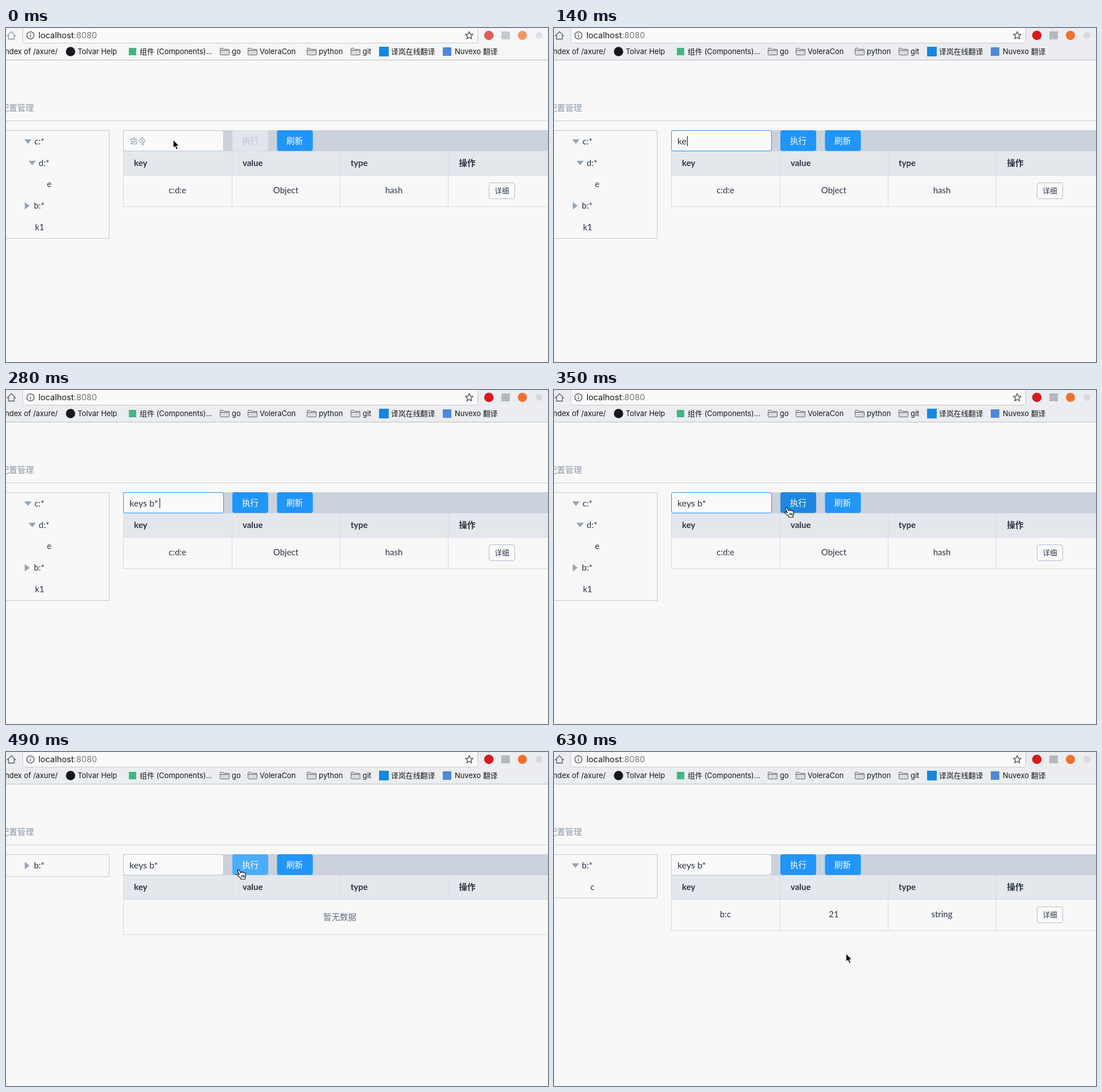
An HTML page that plays this animation: 953x588 px, repeating every 0.7 s.

```html
<!DOCTYPE html>
<html lang="zh">
<head>
<meta charset="utf-8">
<style>
  html, body { margin: 0; width: 100%; height: 100%; overflow: hidden; background: #f8f8f8; }
  svg { display: block; width: 953px; height: 588px; }
  text { font: 15px Lato, "Noto Sans CJK SC", "Noto Sans CJK", sans-serif; fill: #2b3545; white-space: pre; }
  .ui text { font: 12.9px Inter, "Noto Sans CJK SC", "Noto Sans CJK", sans-serif; fill: #141619; }
  .ui .url { font-size: 14.6px; }
  .cjk { font-size: 14.6px; }
  .head text { font-weight: 700; }
  .mid { text-anchor: middle; }
  .white { fill: #fff; }
  .typed { font-size: 16px; }
  .muted { fill: #8c98a9; }
  .line { fill: none; stroke: #d2dbe6; }
  .tri { fill: #93a4bb; }
</style>
</head>
<body>
<svg viewBox="0 0 953 588">
  <defs>
    <g id="folder" fill="#d9dadc" stroke="#65686c">
      <path d="M.5 11.5v-10q0-1 1-1h4l2 2h8q1 0 1 1v8q0 1-1 1h-14q-1 0-1-1z"/>
      <path d="M.5 4.5h16" fill="none"/>
    </g>
    <path id="arrow" d="M0 0v14.2l3.2-3 2.6 6 2.4-1-2.6-5.8h4.6z" fill="#000" stroke="#fff"/>
    <path id="hand" d="M-1 1.5Q0-1 2 1l3 5V4.5q2-1 2.5.6 2-1 2.6.7 2.4-.7 2.8 1.2l.7 4-1.2 3.5v2.5H5.2l-1-2.5L-2 9.6q-.8-2 1.4-1.8L2.2 9z M6.6 9.5v4M8.7 9.5v4M10.8 9.5v4"
      fill="#fff" stroke="#111" stroke-width="1.2" stroke-linejoin="round"/>
  </defs>
  <rect width="953" height="588" fill="#f8f8f8"/>

  <g class="ui">
    <rect id="chrome" width="953" height="56"/>
    <path d="M0 56.5h953" stroke="#b9bfc7"/>
    <rect x="29.5" y="-5" width="800" height="31.500" rx="3" fill="#fafafa" stroke="#c3c7cc"/>
    <path id="home" d="M2.500 13.500l7-7 7 7h-2v6h-10v-6z" fill="none" stroke-width="1.3"/>
    <g fill="none" stroke="#4e5358" stroke-width="1.4">
      <circle cx="43" cy="13" r="6.400"/>
      <path d="M43 12v4.500M43 9v1.600"/>
      <path id="star" stroke-linejoin="round"/>
    </g>
    <text class="url" x="57" y="18">localhost<tspan fill="#73777c">:8080</tspan></text>
    <g id="extensions">
      <circle cx="849" cy="13" r="8.300" fill="#d81a1c"/>
      <rect x="871" y="6" width="15" height="14" fill="#b5b9be"/>
      <circle cx="908" cy="13" r="8" fill="#f2702e"/>
      <circle cx="937" cy="13" r="6" fill="#d6d9dd"/>
    </g>
    <text x="91" y="46" text-anchor="end">Index of /axure/</text>
    <circle cx="113.500" cy="41.500" r="8.200" fill="#17191c"/>
    <text x="126" y="46">Tolvar Help</text>
    <rect x="216" y="35" width="13" height="13" fill="#41b883"/>
    <text x="235" y="46">组件 (Components)...</text>
    <use href="#folder" x="376" y="35"/><text x="397" y="46">go</text>
    <use href="#folder" x="425" y="35"/><text x="446" y="46">VoleraCon</text>
    <use href="#folder" x="529" y="35"/><text x="550" y="46">python</text>
    <use href="#folder" x="606" y="35"/><text x="627" y="46">git</text>
    <rect x="656" y="33" width="17" height="17" fill="#1686e0"/>
    <text x="677" y="46">译岚在线翻译</text>
    <rect x="768" y="34" width="15" height="15" fill="#5087d8"/>
    <text x="789" y="46">Nuvexo 翻译</text>
  </g>

  <text class="cjk muted" x="49" y="146" text-anchor="end">配置管理</text>
  <path d="M0 163.500h953" stroke="#c9ced6"/>

  <rect id="treeHover" y="180" width="181" height="38" fill="#d9e0e8"/>
  <rect id="treeBox" x="-2" y="180.500" width="183.500" fill="none" stroke="#bfcad8"/>
  <g id="tree"></g>

  <rect x="206" y="180" width="747" height="37" fill="#cbd2dc"/>
  <rect id="input" x="206.500" y="180.500" width="176" height="36" rx="3.500" fill="#fafafa"/>
  <text id="command" y="205"></text>
  <path id="caret" stroke="#111"/>
  <rect id="run" x="398" y="180" width="63" height="36.500" rx="4"/>
  <text id="runLabel" class="cjk mid" x="429.500" y="204">执行</text>
  <rect x="476.500" y="180" width="63" height="36.500" rx="4" fill="#2095fc"/>
  <text class="cjk mid white" x="507.500" y="204">刷新</text>

  <rect x="206" y="217" width="747" height="42" fill="#e4e8ed"/>
  <g class="head">
    <text x="225" y="243">key</text>
    <text x="416" y="243">value</text>
    <text x="606" y="243">type</text>
    <text class="cjk" x="796.500" y="243">操作</text>
  </g>
  <path class="line" d="M206 259.500h747M397.500 217v42M587.500 217v42M777.500 217v42"/>
  <path id="frame" class="line"/>
  <g id="row">
    <path class="line" d="M397.500 259v55M587.500 259v55M777.500 259v55"/>
    <text id="key" class="mid" x="301.500" y="291"></text>
    <text id="value" class="mid" x="492" y="291"></text>
    <text id="type" class="mid" x="682" y="291"></text>
    <rect x="849.500" y="272.500" width="45" height="28" rx="3.500" fill="#fafafa" stroke="#afbdcd"/>
    <text class="mid" x="872" y="291" style="font-size:12.700px">详细</text>
  </g>
  <text id="empty" class="cjk mid" x="587" y="296" style="fill:#657084">暂无数据</text>

  <use id="pointer"/>
</svg>
<script>
const STEP = 70, STEPS = 10, ROW = 37.7;
const $ = id => document.getElementById(id);
const set = (id, attrs) => {
  for (const name in attrs) $(id).setAttribute(name, attrs[name]);
};
const show = (id, visible) => set(id, { visibility: visible ? 'visible' : 'hidden' });

const starPoints = Array.from({ length: 10 }, (_, i) => {
  const r = i % 2 ? 3.2 : 7.2, a = (i / 5 - 0.5) * Math.PI;
  return `${814.5 + r * Math.cos(a)} ${13.3 + r * Math.sin(a)}`;
});
set('star', { d: `M${starPoints.join('L')}z` });

// Tree entries: [label, label x, arrow direction, arrow x]
const trees = {
  all: [['c:*', 50, 'down', 32], ['d:*', 57.5, 'down', 39.5], ['e', 72],
        ['b:*', 49, 'right', 33], ['k1', 51]],
  closed: [['b:*', 49, 'right', 33]],
  open: [['b:*', 49, 'down', 31], ['c', 64]]
};
const rows = { all: ['c:d:e', 'Object', 'hash'], open: ['b:c', '21', 'string'] };
const runColors = { off: '#e2e6ec', on: '#2095fc', pressed: '#1f87e2', hover: '#4aadff' };

function drawTree(name) {
  $('tree').innerHTML = trees[name].map(([label, x, dir, ax], i) => {
    const y = 200 + i * ROW;
    const shape = dir === 'down' ? `M${ax} ${y - 4}h13l-6.5 8z` : `M${ax} ${y - 6.5}l8.500 6.500-8.500 6.500z`;
    return (dir ? `<path class="tri" d="${shape}"/>` : '') + `<text x="${x}" y="${y + 5}">${label}</text>`;
  }).join('');
  set('treeBox', { height: { all: 190, closed: 38.5, open: 76.5 }[name] });
}

function drawTable(name) {
  const row = rows[name];
  show('row', row);
  show('empty', !row);
  if (row) ['key', 'value', 'type'].forEach((id, i) => $(id).textContent = row[i]);
  set('frame', { d: `M206.5 217V${row ? 314.5 : 321.5}H953` });
}

function pointerAt(step) {
  if (step === 0) return ['arrow', 294, 197];
  if (step >= 5 && step <= 7) return ['hand', 408, 207];
  if (step === 8) return ['hand', 92, 214];
  if (step === 9) return ['arrow', 513.5, 355];
}

function draw(step) {
  const active = step > 0;
  const focused = step >= 1 && step <= 5;
  const typed = ['', '', 'ke', 'keys '][step] ?? 'keys b*';
  const view = step < 7 ? 'all' : step === 7 ? 'closed' : 'open';
  const run = !typed ? 'off' : step === 5 ? 'pressed' : step === 6 || step === 7 ? 'hover' : 'on';

  set('chrome', { fill: active ? '#ebedf0' : '#f5f6f7' });
  set('home', { stroke: active ? '#555a60' : '#8d949c' });
  set('extensions', { opacity: active ? 1 : 0.7 });

  set('input', { stroke: focused ? '#2095fc' : '#b9c7d7' });
  $('command').textContent = typed || '命令';
  set('command', { class: typed ? 'typed' : 'cjk muted', x: typed ? 217 : 217.5 });
  const caretX = { 1: 217.5, 2: 234.5, 3: 252.5, 4: 270.5 }[step];
  show('caret', caretX);
  set('caret', { d: `M${caretX || 0} 190v18` });
  set('run', { fill: runColors[run] });
  $('runLabel').style.fill = run === 'off' ? '#bac3cf' : '#fff';

  drawTree(view);
  drawTable(view);
  show('treeHover', step === 8);

  const pointer = pointerAt(step);
  show('pointer', pointer);
  if (pointer) set('pointer', { href: '#' + pointer[0], x: pointer[1], y: pointer[2] });
}

const start = performance.now();
let shown = -1;
function tick() {
  const step = Math.floor((performance.now() - start) / STEP) % STEPS;
  if (step !== shown) draw(shown = step);
  requestAnimationFrame(tick);
}
tick();
</script>
</body>
</html>
```
